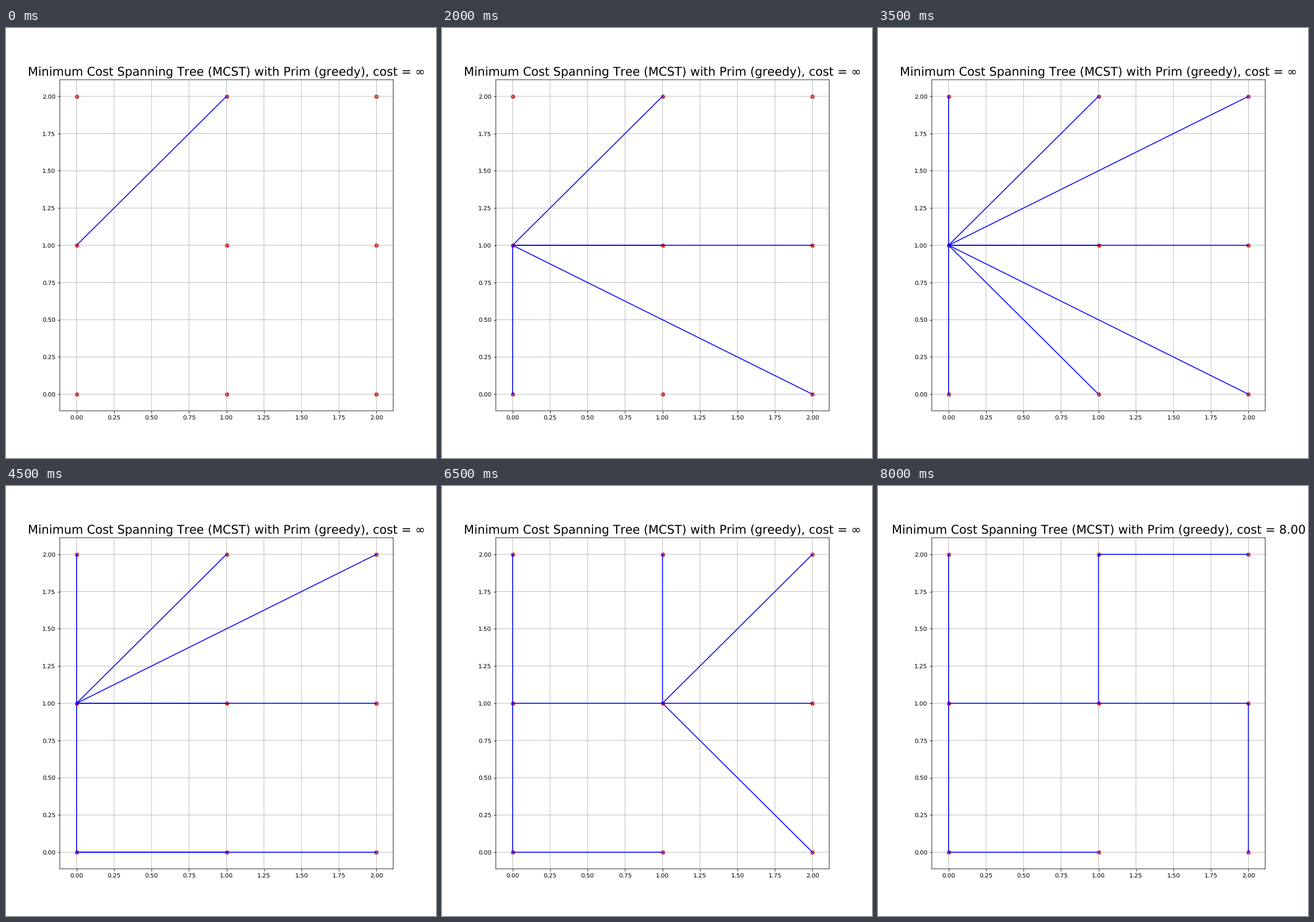
Write a matplotlib script that moves like this. It is 748 px wide and 748 px high and loops after 9 s.

```python
import math

import matplotlib.pyplot as plt
from matplotlib.animation import FuncAnimation

NODES = [(0, 1), (1, 2), (0, 0), (2, 1), (2, 0), (1, 1), (2, 2), (1, 0), (0, 2)]
TITLE = "Minimum Cost Spanning Tree (MCST) with Prim (greedy), cost = "
HOLD = 2  # frames spent on the finished tree
LIMITS = (-0.1115, 2.1115)
STYLE = {
    "font.family": "DejaVu Sans",
    "text.hinting": "no_hinting",
    "text.kerning_factor": 6,  # no pair kerning
    "path.snap": False,
}


def prim(nodes):
    """Return a snapshot of the parent map after every edge update."""
    cost = {node: math.inf for node in nodes}
    cost[nodes[0]] = 0
    parent, snapshots = {}, []
    waiting = list(nodes)
    while waiting:
        current = min(waiting, key=cost.get)
        waiting.remove(current)
        for node in waiting:
            distance = math.dist(current, node)
            if distance < cost[node]:
                cost[node] = distance
                parent[node] = current
                snapshots.append(dict(parent))
    return snapshots, sum(cost.values())


snapshots, total = prim(NODES)

plt.rcParams.update(STYLE)
fig, ax = plt.subplots(figsize=(10, 10), dpi=74.8)
fig.subplots_adjust(left=0.1253, right=0.9003, bottom=0.1097, top=0.8797)
ax.scatter(*zip(*NODES), color="r")
ax.set(xlim=LIMITS, ylim=LIMITS)
ax.grid()
title = ax.set_title("", fontsize=20)
edges = {node: ax.plot([], [], "b")[0] for node in NODES[1:]}


def draw(frame):
    tree = snapshots[min(frame, len(snapshots) - 1)]
    for node, line in edges.items():
        if node in tree:
            line.set_data(*zip(tree[node], node))
        else:
            line.set_data([], [])
    finished = frame >= len(snapshots)
    title.set_text(TITLE + (f"{total:.2f}" if finished else "∞"))
    return [title, *edges.values()]


anim = FuncAnimation(fig, draw, frames=len(snapshots) + HOLD, interval=500,
                     repeat=True, repeat_delay=0)
plt.show()
```
